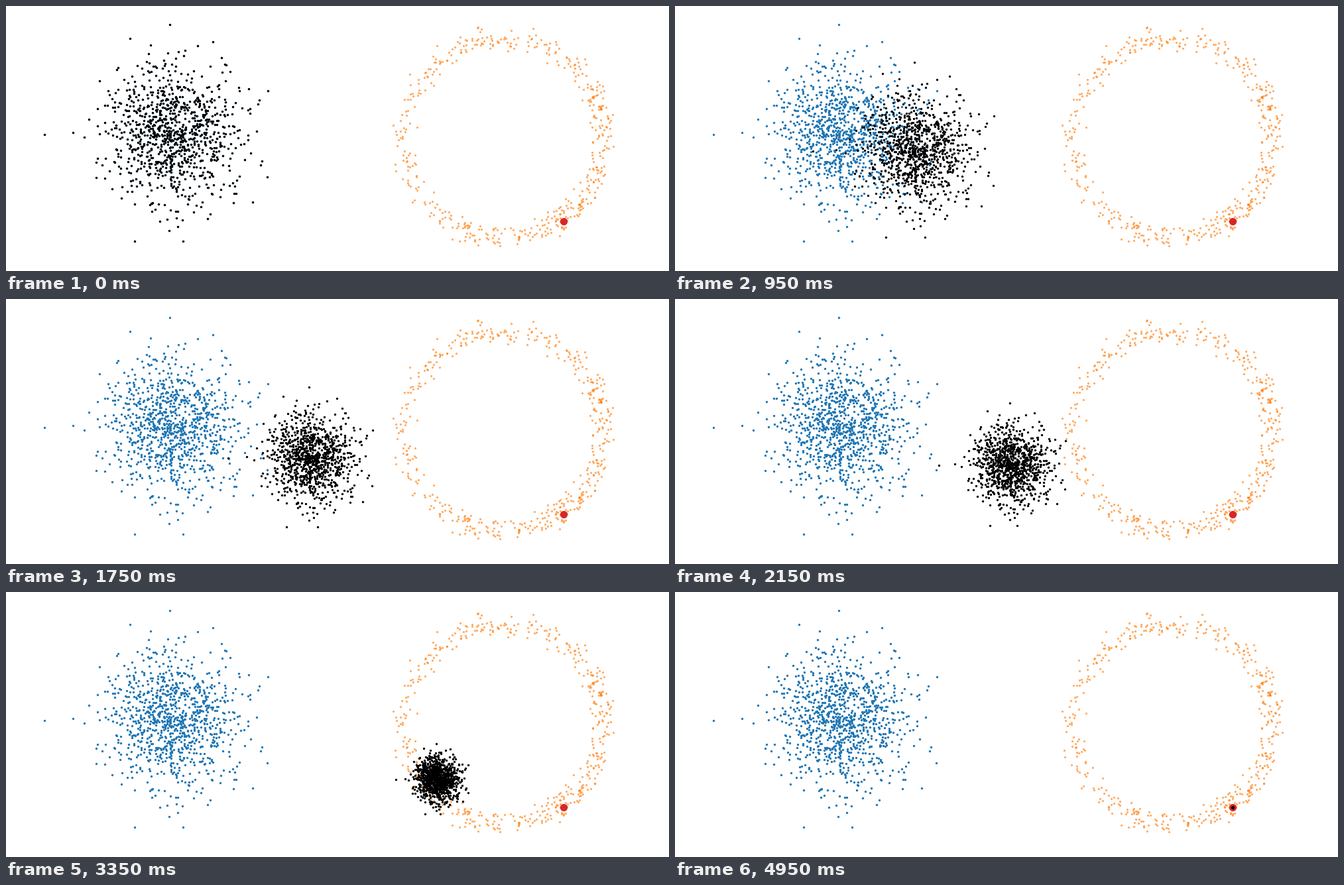
A matplotlib script that plays this animation: 1000x400 px, repeating every 5 s.

```python
import numpy as np
import matplotlib.pyplot as plt
from matplotlib.animation import FuncAnimation

WIDTH, HEIGHT, DPI = 1000, 400, 100
FRAMES, INTERVAL = 100, 50
UNIT = 50  # pixels per standard deviation of the cloud
CLOUD_SIZE, RING_SIZE = 1000, 490
CLOUD_CENTER = np.array([251, 198])
RING_CENTER = np.array([750, 199])
TARGET = np.array([841, 325])
EXTREMES = [(58, 194), (247, 28), (395, 128), (394, 258), (372, 296),
            (267, 355), (194, 355), (187, 49), (312, 54), (101, 191)]

rng = np.random.default_rng(7)


def make_cloud():
    steps = rng.normal(size=(2 * CLOUD_SIZE, 2))
    steps = steps[np.hypot(*steps.T) < 2.9][:CLOUD_SIZE - len(EXTREMES)]
    return np.vstack([CLOUD_CENTER + UNIT * steps, EXTREMES])


def make_ring():
    angle = rng.uniform(0, 2 * np.pi, 2 * RING_SIZE)
    # The ring is thinnest at the upper left
    density = 0.75 - 0.25 * np.cos(angle - np.radians(135))
    angle = angle[rng.random(len(angle)) < density][:RING_SIZE]
    radius = UNIT * (3.02 + np.clip(rng.normal(0, 0.18, len(angle)), -0.4, 0.4))
    direction = np.array([np.cos(angle), -np.sin(angle)])
    return RING_CENTER + (radius * direction).T


def dots(points, size, color, **style):
    return ax.scatter(*points.T, s=size, color=color, **style)


fig = plt.figure(figsize=(WIDTH / DPI, HEIGHT / DPI), dpi=DPI, facecolor="white")
ax = fig.add_axes([0, 0, 1, 1])
ax.set(xlim=(0, WIDTH), ylim=(HEIGHT, 0))
ax.axis("off")

cloud = make_cloud()
dots(cloud, 2, "tab:blue")
dots(make_ring(), 2, "tab:orange", alpha=0.5)
dots(TARGET[None, :], 50, "tab:red", zorder=2)
movers = dots(cloud, 2, "black", zorder=3)


def update(frame):
    t = frame / (FRAMES - 1)
    movers.set_offsets((1 - t) * cloud + t * TARGET)
    return (movers,)


animation = FuncAnimation(fig, update, frames=FRAMES, interval=INTERVAL,
                          repeat=True, repeat_delay=0)
plt.show()
```
